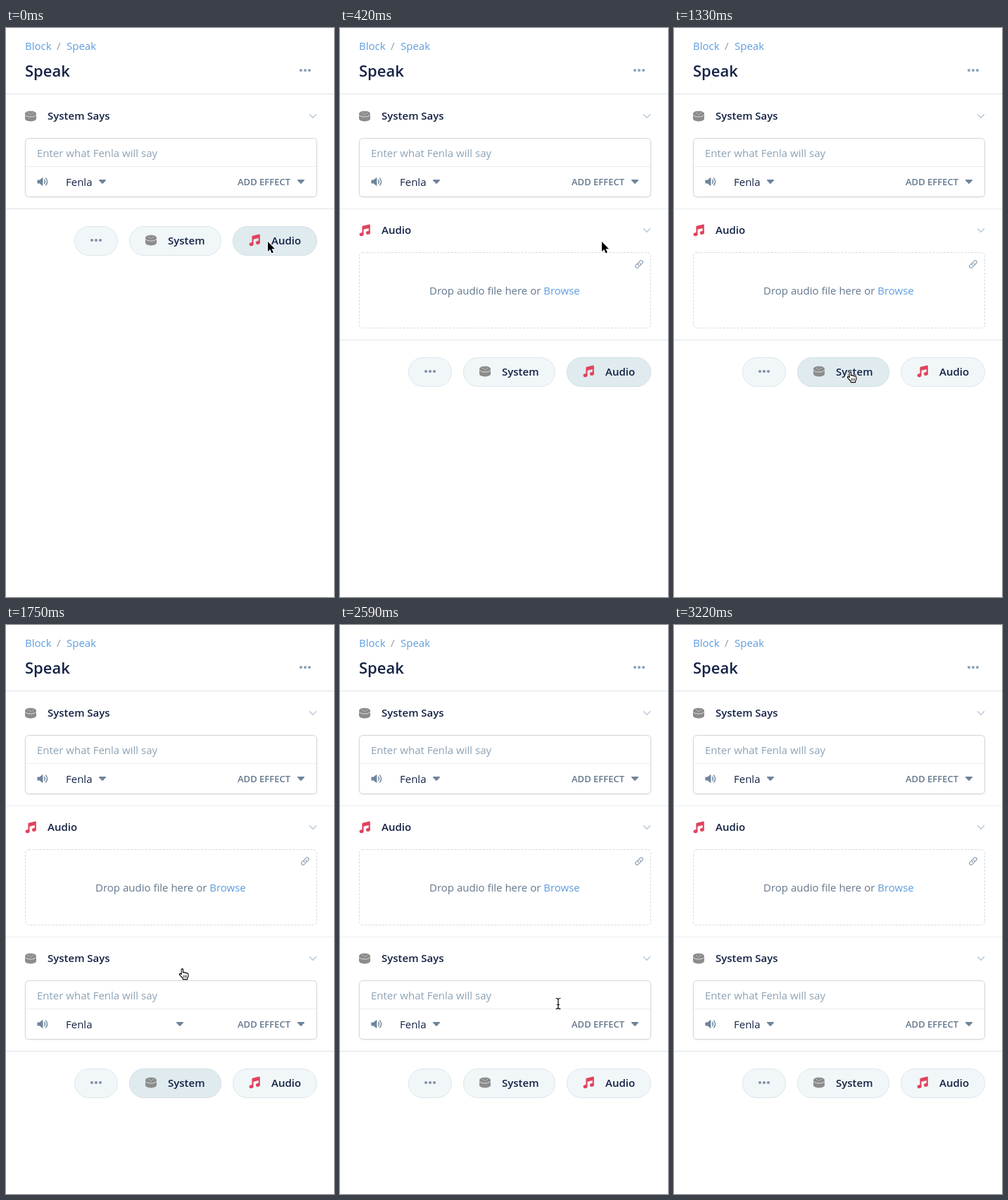
An HTML page with a canvas that plays this animation: 466 by 807 pixels, repeating every 4.13 s.

```html
<!DOCTYPE html>
<html lang="en">
<head>
<meta charset="utf-8">
<title>Speak block</title>
<style>
html, body { margin: 0; width: 100%; height: 100%; overflow: hidden; background: #fff; }
canvas { display: block; width: 466px; height: 807px; }
</style>
</head>
<body>
<canvas id="stage"></canvas>
<script>
const W = 466, H = 807, LOOP = 4130, STEP = 70;
const ASSISTANT = 'Fenla';
const INK = '#132144', LINK = '#5d9de0', SLATE = '#62778c', STEEL = '#6e849a',
      MUTED = '#8da2b5', LINE = '#dfe3e8', SOFT = '#eaeff4', BORDER = '#d0d6dc';

const canvas = document.getElementById('stage');
const ctx = canvas.getContext('2d');
const dpr = window.devicePixelRatio || 1;
canvas.width = W * dpr;
canvas.height = H * dpr;

const clamp = (v) => Math.max(0, Math.min(1, v));
const progress = (t, from, to) => clamp((t - from) / (to - from));
const ease = (u) => u * u * (3 - 2 * u);
const mix = (a, b, u) => a + (b - a) * u;
const blend = (a, b, u) => `rgb(${a.map((v, i) => Math.round(mix(v, b[i], u)))})`;

function at(x, y, draw) {
  ctx.save();
  ctx.translate(x, y);
  draw();
  ctx.restore();
}

function text(str, x, y, color, size = 15, weight = 400) {
  ctx.font = `${weight} ${size}px "Open Sans", sans-serif`;
  ctx.fillStyle = color;
  ctx.fillText(str, x, y);
  return x + ctx.measureText(str).width;
}

function rule(x, y, w, color) {
  ctx.fillStyle = color;
  ctx.fillRect(x, y, w, 1);
}

function fillPath(d, color) {
  ctx.fillStyle = color;
  ctx.fill(new Path2D(d));
}

function strokePath(d, color, width) {
  ctx.strokeStyle = color;
  ctx.lineWidth = width;
  ctx.lineCap = ctx.lineJoin = 'round';
  ctx.stroke(new Path2D(d));
}

function box(x, y, w, h, r) {
  ctx.beginPath();
  ctx.roundRect(x + 0.5, y + 0.5, w - 1, h - 1, r);
}

function dots(x, y, color) {
  ctx.fillStyle = color;
  for (const dx of [-6, 0, 6]) {
    ctx.beginPath();
    ctx.arc(x + dx, y, 2.1, 0, Math.PI * 2);
    ctx.fill();
  }
}

function speakerPuck(x, y) {
  at(x, y, () => {
    fillPath('M-8 -3C-8 -5.8 -4.5 -7.2 0 -7.2S8 -5.8 8 -3V3.3C8 6 4.5 7.4 0 7.4S-8 6 -8 3.3Z', '#8c8c8c');
    strokePath('M-7.8 -1.6C-6 2 6 2 7.8 -1.6', '#e4e6e6', 0.9);
    strokePath('M-3.4 -4.2H-2.4M2.4 -4.2H3.4M-0.5 -2.6H0.5', '#d0d2d2', 0.9);
  });
}

function notes(x, y) {
  at(x, y, () => {
    const red = '#e0435c';
    fillPath('M-3.6 -5.2Q-3.6 -6 -2.8 -6.3L6.5 -8.4Q7.8 -8.6 7.8 -7.4V3.4H5.7V-3L-1.5 -1.2V5.6H-3.6Z', red);
    ctx.beginPath();
    ctx.ellipse(-4.4, 5.6, 3, 2.5, -0.2, 0, 7);
    ctx.fill();
    ctx.beginPath();
    ctx.ellipse(4.9, 3.4, 3, 2.5, -0.2, 0, 7);
    ctx.fill();
  });
}

function volume(x, y) {
  at(x, y, () => {
    fillPath('M0 -2.6H2.8L6.6 -5.8Q7.4 -6.2 7.4 -5.2V5.2Q7.4 6.2 6.6 5.8L2.8 2.6H0Q-0.6 2.6 -0.6 2V-2Q-0.6 -2.6 0 -2.6Z', STEEL);
    strokePath('M9.6 -2.5Q11.4 0 9.6 2.5M11.6 -4.9Q15.6 0 11.6 4.9', STEEL, 1.4);
  });
}

function caret(x, y) {
  at(x, y, () => fillPath('M-4.3 -3H4.3Q5.6 -2.8 4.8 -1.7L0.9 2.6Q0 3.5 -0.9 2.6L-4.8 -1.7Q-5.6 -2.8 -4.3 -3Z', STEEL));
}

function chainLink(x, y) {
  at(x, y, () => {
    ctx.rotate(-Math.PI / 4);
    const half = 'M-1 -2.3H-4.2A2.3 2.3 0 0 0 -4.2 2.3H-0.4A2.3 2.3 0 0 0 1.7 -0.5';
    strokePath(half, MUTED, 1.2);
    ctx.rotate(Math.PI);
    strokePath(half, MUTED, 1.2);
  });
}

function header(y, label, icon) {
  icon(35, y + 31);
  text(label, 59, y + 36, INK, 15, 600);
  at(436, y + 31, () => strokePath('M-4.5 -2.2L0 2.3L4.5 -2.2', '#bccad8', 1.6));
}

function systemSection(y, caretX) {
  header(y, 'System Says', speakerPuck);
  at(0, y + 62, () => {
    ctx.save();
    ctx.shadowColor = 'rgba(19,33,68,0.08)';
    ctx.shadowBlur = 3;
    ctx.shadowOffsetY = 1;
    box(27, 0, 415, 84, 5);
    ctx.fillStyle = '#fff';
    ctx.fill();
    ctx.restore();
    ctx.strokeStyle = BORDER;
    ctx.lineWidth = 1;
    ctx.stroke();
    rule(28, 40, 413, SOFT);
    text(`Enter what ${ASSISTANT} will say`, 44, 27, MUTED);
    volume(45, 62);
    text(ASSISTANT, 85, 68, INK);
    caret(caretX, 62);
    text('ADD EFFECT', 329, 67, SLATE, 13, 600);
    caret(419, 62);
  });
}

function audioSection(y) {
  header(y, 'Audio', notes);
  ctx.save();
  box(27, y + 62, 415, 108, 5);
  ctx.strokeStyle = '#d2dae2';
  ctx.lineWidth = 1;
  ctx.lineCap = 'butt';
  ctx.setLineDash([3, 2]);
  ctx.stroke();
  ctx.restore();
  chainLink(425, y + 79);
  const end = text('Drop audio file here or ', 127, y + 122, SLATE);
  text('Browse', end, y + 122, LINK);
}

function pill(x, y, w, hover) {
  box(x, y, w, 42, 21);
  ctx.fillStyle = blend([241, 247, 248], [223, 235, 239], hover);
  ctx.fill();
  ctx.strokeStyle = blend([220, 230, 235], [211, 223, 229], hover);
  ctx.lineWidth = 1;
  ctx.stroke();
}

function buttons(y, systemHover, audioHover) {
  pill(97, y, 62, 0);
  dots(128, y + 20, '#8491ab');
  pill(175, y, 131, systemHover);
  speakerPuck(206, y + 20);
  text('System', 230, y + 26, INK, 15, 600);
  pill(322, y, 120, audioHover);
  notes(353, y + 20);
  text('Audio', 377, y + 26, INK, 15, 600);
}

const cursors = {
  arrow() {
    const d = 'M0 0V14L3.2 11L5.5 16.3L7.9 15.3L5.6 10.2H10Z';
    strokePath(d, '#fff', 2);
    fillPath(d, '#000');
  },
  hand() {
    const d = 'M3.2 8.6V2Q3.2 0.6 4.4 0.6T5.6 2V6Q7.6 5 8.2 6.4Q10 5.6 10.6 7Q13 6.4 13 8.8V11.5L11.8 13.6V15.6H5.2V14L1 9.6Q-0.4 7.6 1.4 7.4Q2.2 7.4 3.2 8.6Z';
    strokePath(d, '#fff', 2.6);
    fillPath(d, '#fff');
    strokePath(d, '#000', 1.1);
    strokePath('M6.3 10V13M8.3 10V13M10.3 10V13', '#000', 0.8);
  },
  beam() {
    const d = 'M-3 -7.5Q0 -7.5 0 -5.5Q0 -7.5 3 -7.5M-3 7.5Q0 7.5 0 5.5Q0 7.5 3 7.5M0 -6V6M-1.5 1.5H1.5';
    strokePath(d, '#fff', 2.6);
    strokePath(d, '#000', 1.2);
  }
};

function pointer(t) {
  if (t < 840) return { x: 372, y: 303, kind: 'arrow' };
  if (t < 2100) {
    // swings right, then curls back to the System button
    const u = ease(progress(t, 840, 1330));
    const curve = (a, b, c) => mix(mix(a, b, u), mix(b, c, u), u);
    const x = curve(371, 435, 246), y = curve(303, 500, 487);
    const over = y > 467 && (x > 322 || x < 304);
    return { x, y, kind: over && t < 1960 ? 'hand' : 'arrow' };
  }
  if (t < 2660) {
    const u = ease(progress(t, 2030, 2590));
    const y = mix(487, 537, u);
    return { x: mix(246, 310, u), y, kind: y > 505 ? 'beam' : 'arrow' };
  }
  if (t < 3010) {
    const u = ease(progress(t, 2590, 2940));
    const y = mix(537, 555, u);
    return { x: mix(310, 421, u), y, kind: y < 545 ? 'beam' : 'arrow' };
  }
  return null;
}

function draw(t) {
  ctx.setTransform(dpr, 0, 0, dpr, 0, 0);
  ctx.fillStyle = '#fff';
  ctx.fillRect(0, 0, W, H);

  text('Block', 27, 31, LINK);
  text('/', 72, 31, '#8d9cab');
  text('Speak', 86, 31, LINK);
  text('Speak', 27, 69, INK, 22, 600);
  dots(425, 60, MUTED);
  rule(0, 93, W, LINE);

  systemSection(94, 137);
  let bottom = 256;
  if (t >= 420) {
    rule(0, 256, W, SOFT);
    audioSection(256);
    bottom = 442;
  }
  if (t >= 1750) {
    rule(0, 442, W, SOFT);
    systemSection(442, t < 1820 ? 247 : 137);
    bottom = 604;
  }
  rule(0, bottom, W, LINE);

  const p = pointer(t);
  const moving = t >= 840 && t < 1750 && p.y > 467;
  const systemHover = t >= 1750 ? 1 - progress(t, 1820, 2030) : moving && p.x < 306 ? 1 : 0;
  const audioHover = t < 840 ? 1 - progress(t, 420, 630) : moving && p.x > 322 ? 1 : 0;
  buttons(bottom + 25, systemHover, audioHover);

  if (p) at(p.x, p.y, cursors[p.kind]);
}

const start = performance.now();
function tick() {
  const t = (performance.now() - start) % LOOP;
  draw(Math.floor(t / STEP) * STEP);
  requestAnimationFrame(tick);
}
tick();
</script>
</body>
</html>
```
